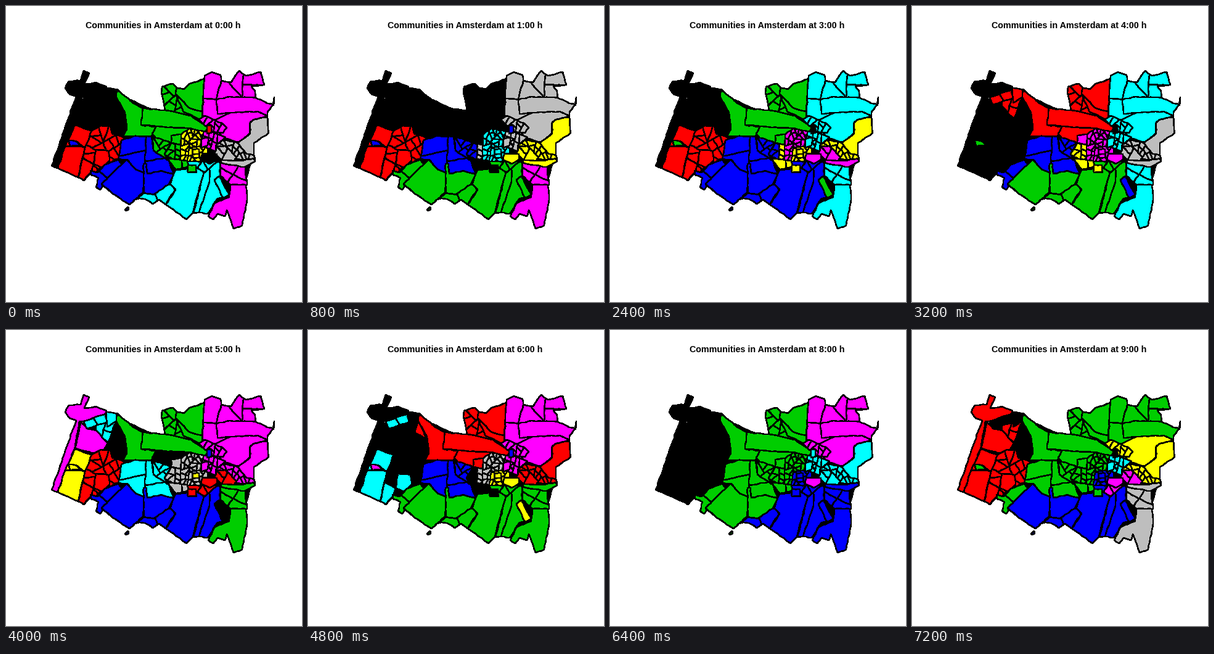
A matplotlib script for the animation above (8000 ms loop, 480 by 480 pixels).

```python
import matplotlib.pyplot as plt
import numpy as np
from matplotlib.animation import FuncAnimation
from matplotlib.collections import LineCollection
from matplotlib.patches import Polygon

SIZE, DPI = 480, 80
PX = 72 / DPI
HOURS = 10
COLORS = dict(k="#000000", r="#ff0000", g="#00cd00", b="#0000ff",
              c="#00ffff", m="#ff00ff", y="#ffff00", a="#bebebe")
PEN = dict(lw=1.5 * PX, antialiased=False)

# One colour letter per hour for areas that stay together
COAST, BEACH, TOWN = "kkkkkmkrkr", "rrrrkycrkr", "rrrrkrkrkr"
POLDER, SOUTH, LAKE = "bggbgbgggb", "cggbgbgbbb", "bbbbbcbggg"
PORT, NORTH, RIVER = "gkkgrgrkgg", "macccmmamg", "ayryamrgcy"
WATERFRONT, CORE = "macccmmamy", "macccmmacc"

fig = plt.figure(figsize=(SIZE / DPI, SIZE / DPI), dpi=DPI, facecolor="white")
ax = fig.add_axes([0, 0, 1, 1])
ax.set_xlim(0, SIZE)
ax.set_ylim(SIZE, 0)
ax.axis("off")
zones = []


def rough_edge(p, q):
    """Points from p towards q with a small wobble, the same in both directions."""
    if tuple(p) > tuple(q):
        return np.vstack([p, rough_edge(q, p)[:0:-1]])
    step = q - p
    length = np.hypot(*step)
    n = int(length // 7)
    rng = np.random.default_rng(int(abs(p + q).sum() * 7))
    t = np.arange(n + 1)[:, None] / (n + 1)
    wobble = rng.uniform(-0.8, 0.8, (n + 1, 1))
    wobble[0] = 0
    return p + step * t + wobble * np.array([-step[1], step[0]]) / max(length, 1)


def cuts(poly, cell, rng):
    """Halve an area across its long side until the parts are about `cell` wide."""
    x, y = poly.T
    area = abs(x @ np.roll(y, 1) - y @ np.roll(x, 1)) / 2
    if area < 1.4 * cell ** 2:
        return []
    centre = poly.mean(axis=0)
    axis = np.linalg.svd(poly - centre)[2][0]
    turn = rng.normal(0, 0.3)
    normal = axis * np.cos(turn) + axis[::-1] * (-1, 1) * np.sin(turn)
    side = (poly - centre) @ normal
    left, right, ends = [], [], []
    for p, q, s, t in zip(poly, np.roll(poly, -1, 0), side, np.roll(side, -1)):
        (left if s < 0 else right).append(p)
        if s * t < 0:
            ends.append(p + (q - p) * s / (s - t))
            left.append(ends[-1])
            right.append(ends[-1])
    if len(ends) < 2:
        return []
    cut = np.vstack([rough_edge(ends[0], ends[-1]), ends[-1]])
    return ([cut] + cuts(np.array(left), cell, rng)
            + cuts(np.array(right), cell, rng))


def zone(hours, *xy, cell=None):
    """Add an area from its corners, split into neighbourhoods if `cell` is set."""
    corners = np.reshape(xy, (-1, 2)).astype(float)
    outline = np.vstack([rough_edge(p, q)
                         for p, q in zip(corners, np.roll(corners, -1, 0))])
    patch = Polygon(outline, ec="black", joinstyle="round", **PEN)
    ax.add_patch(patch)
    zones.append((patch, hours))
    if cell:
        rng = np.random.default_rng(len(zones))
        lines = LineCollection(cuts(corners, cell, rng), colors="black",
                               zorder=1, **PEN)
        ax.add_collection(lines)
        lines.set_clip_path(patch)


# Land below all areas
zone("k" * HOURS, 118, 155, 178, 142, 256, 176, 265, 140, 335, 125, 395, 160,
     398, 250, 372, 350, 358, 322, 300, 328, 240, 308, 200, 315, 140, 266,
     120, 274, 85, 258)

# West coast
zone(COAST, 126, 105, 135, 109, 127, 127, 146, 124, 163, 131, 160, 138,
     126, 148, 119, 148, 112, 190, 84, 263, 74, 259, 99, 188, 114, 147,
     103, 143, 96, 133, 102, 122, 121, 121)
zone(COAST, 122, 148, 131, 160, 158, 165, 165, 183, 158, 196, 140, 200,
     112, 191)
zone("kkkkrckrkr", 146, 151, 178, 150, 165, 183, 145, 162, cell=14)
zone("kkkkrcckkk", 126, 148, 162, 136, 163, 150, 131, 160, cell=14)
zone("kkckrckkkk", 163, 133, 180, 136, 179, 148, 164, 157)
zone("k" * HOURS, 174, 160, 193, 172, 196, 202, 186, 213, 170, 208)
zone("kkckkkrkkk", 179, 148, 192, 176, 173, 166)
zone(BEACH, 111, 193, 139, 202, 135, 222, 128, 230, 96, 228, cell=30)
zone(BEACH, 96, 227, 128, 229, 117, 278, 84, 263)
zone("bbmggymykg", 102, 218, 115, 220, 124, 227, 104, 227)
zone(TOWN, 139, 202, 154, 194, 169, 195, 172, 207, 191, 213, 188, 245,
     160, 257, 148, 268, 135, 273, 127, 283, 117, 278, 128, 230, cell=14)
zone("rrrrkrcrkr", 146, 233, 166, 235, 168, 251, 157, 262, 142, 257)
zone("rrrrkrcrkr", 124, 247, 142, 257, 139, 268, 126, 283, 117, 278)

# South-west polder
zone(LAKE, 187, 218, 215, 208, 236, 212, 240, 235, 264, 250, 272, 272,
     248, 270, 229, 272, 210, 265, 196, 249, 182, 248, cell=30)
zone("bgbbbbgggg", 137, 267, 148, 270, 160, 257, 182, 249, 188, 256, 165, 282,
     153, 298, 146, 293, 150, 279, 138, 274, cell=25)
zone(POLDER, 155, 289, 166, 277, 196, 249, 210, 265, 226, 272, 222, 303,
     200, 322, 168, 300)
zone(POLDER, 223, 256, 228, 256, 229, 272, 252, 267, 272, 273, 262, 293,
     239, 306, 224, 303)
zone(POLDER, 193, 330, 198, 326, 199, 330, 195, 332)

# South
zone(SOUTH, 213, 311, 224, 303, 239, 306, 268, 286, 274, 298, 259, 322,
     248, 314, 238, 321, 225, 313, cell=24)
zone(SOUTH, 272, 272, 275, 266, 318, 262, 321, 270, 303, 335, 293, 346,
     259, 322, 275, 298, 266, 289)
zone(SOUTH, 321, 250, 333, 255, 330, 285, 313, 335, 304, 336, 321, 270)
zone(SOUTH, 331, 252, 350, 254, 346, 268, 362, 306, 360, 311, 343, 312,
     327, 337, 313, 335, 330, 285)
zone("mmaccggbba", 348, 253, 388, 260, 391, 312, 383, 356, 369, 361, 358, 331,
     355, 341, 343, 337, 336, 346, 328, 341, 338, 320, 362, 310, 364, 290,
     391, 290, 364, 290, 347, 275)
zone("mmaccggbba", 348, 253, 388, 260, 391, 290, 364, 290, 347, 275, cell=16)
zone("cgygbkyabb", 338, 282, 346, 276, 362, 306, 352, 311)

# North
zone(PORT, 180, 135, 202, 154, 222, 166, 219, 193, 243, 196, 236, 212,
     190, 211, 196, 200, 193, 173, 179, 148)
zone(PORT, 222, 166, 258, 169, 300, 178, 327, 197, 322, 206, 297, 199,
     219, 193)
zone(PORT, 252, 141, 253, 131, 270, 126, 277, 133, 283, 160, 300, 178,
     258, 169, cell=14)
zone("gkggrgrkgg", 277, 133, 288, 135, 298, 126, 322, 118, 319, 150, 320, 172,
     331, 184, 321, 187, 288, 172, 275, 143, 297, 165, 320, 172, 297, 165,
     275, 143)
zone(NORTH, 320, 150, 322, 113, 334, 107, 348, 112, 349, 121, 341, 152)
zone(NORTH, 349, 121, 365, 124, 378, 105, 389, 113, 413, 107, 419, 128,
     398, 130, 404, 138, 405, 149, 363, 147, 341, 152, cell=24)
zone(NORTH, 341, 152, 363, 147, 405, 149, 413, 152, 424, 158, 433, 159,
     435, 148, 434, 160, 424, 172, 424, 180, 396, 188, 395, 206, 378, 221,
     340, 220, 364, 173, 343, 175)
zone(NORTH, 320, 150, 341, 152, 343, 175, 364, 173, 364, 200, 340, 220,
     318, 182)
zone(WATERFRONT, 336, 186, 364, 173, 408, 171, 424, 178, 396, 188, 395, 206,
     378, 221, 350, 213)

# East
zone(RIVER, 402, 184, 424, 180, 426, 206, 402, 222, 402, 242, 390, 240,
     376, 222, 396, 206, 396, 189)
zone(RIVER, 341, 222, 352, 217, 376, 222, 390, 240, 402, 242, 404, 251,
     345, 247, cell=10)
zone("ayrmaggbba", 345, 247, 378, 251, 402, 247, 404, 252, 387, 261, 350, 255)
zone("ayrmarrgcm", 340, 228, 355, 227, 374, 245, 370, 251, 350, 250, 338, 240,
     cell=14)

# Western suburbs
zone("gkkgrkrkgg", 237, 207, 243, 195, 300, 199, 297, 207, 268, 210, 268, 222,
     250, 221)
zone("gkkgmarkgg", 268, 210, 284, 208, 283, 225, 268, 222)
zone("gbbbbcbggg", 237, 211, 268, 222, 257, 240, 262, 250, 239, 234, cell=11)
zone("gbbbyakmgg", 268, 222, 275, 224, 273, 250, 257, 241, cell=11)
zone("gaayyaamgg", 275, 224, 297, 225, 295, 252, 273, 250, cell=11)
zone("gkkyyakmgg", 262, 247, 295, 250, 308, 258, 275, 265, cell=15)
zone("cggbgrgrbb", 294, 252, 318, 250, 312, 262, 296, 258)
zone("gkkyyrkmbg", 295, 258, 308, 258, 309, 270, 295, 270)

# Centre
zone("cggbgrgrbm", 318, 250, 344, 252, 322, 270, 311, 263, cell=14)
zone("ycmmmaaygg", 284, 208, 298, 198, 322, 204, 321, 226, 300, 231, 296, 252,
     283, 250, cell=8)
zone("ycyymayybb", 297, 231, 325, 225, 327, 238, 318, 252, 294, 252, cell=8)
zone("ycyymyyybb", 302, 233, 313, 232, 314, 240, 302, 241)
zone(CORE, 320, 204, 334, 203, 356, 213, 340, 226, 340, 236, 317, 226, cell=9)
zone("macccmmccc", 316, 216, 328, 213, 327, 226, 316, 230)
zone(WATERFRONT, 312, 184, 322, 178, 350, 190, 358, 197, 352, 206, 334, 204,
     cell=10)
zone("rbbkkbbcck", 326, 194, 333, 193, 334, 205, 326, 207)
zone("kyymmryrmm", 318, 240, 342, 240, 342, 249, 330, 256, 317, 250)

title = ax.text(254.4, 36, "", ha="center", va="baseline", color="black",
                family="Liberation Sans", weight="bold", size=14.3 * PX)


def update(hour):
    title.set_text(f"Communities in Amsterdam at {hour}:00 h")
    for patch, hours in zones:
        patch.set_facecolor(COLORS[hours[hour]])
    return [title]


anim = FuncAnimation(fig, update, frames=HOURS, interval=800, repeat=True,
                     repeat_delay=0, blit=False)
plt.show()
```
